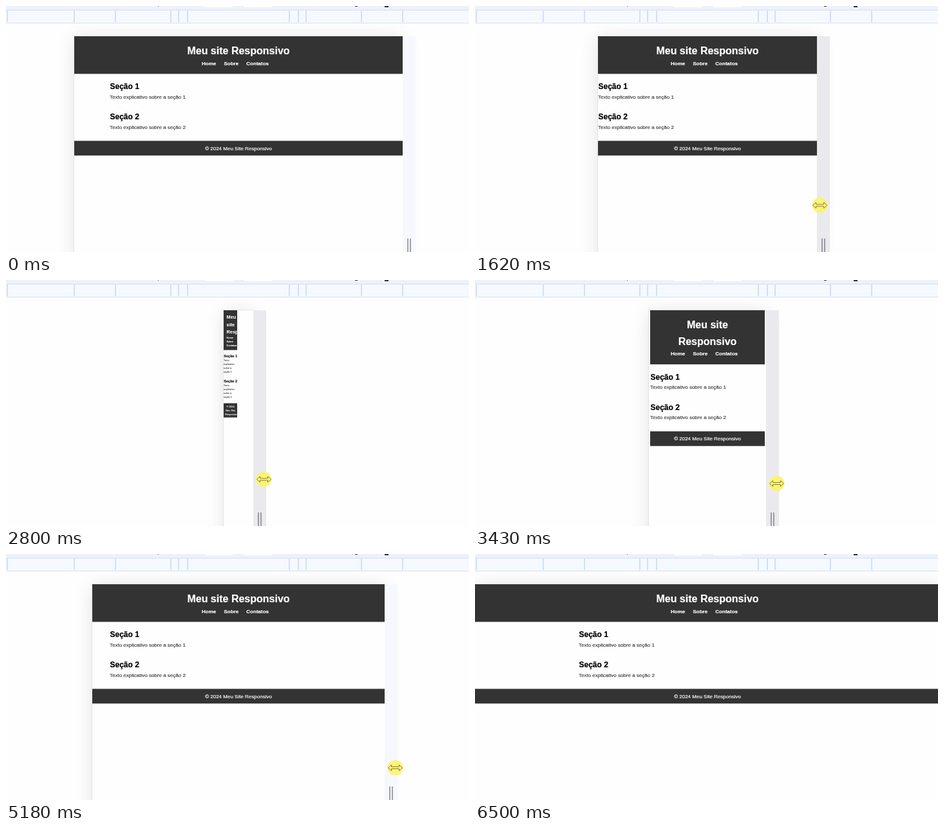
An HTML page with a canvas for the animation above (8.58 s loop, 719 by 382 pixels).

```html
<!DOCTYPE html>
<html lang="pt">
<head>
<meta charset="utf-8">
<title>Meu site Responsivo</title>
<style>
html, body { margin: 0; width: 100%; height: 100%; overflow: hidden; background: #fefefe; }
canvas { display: block; }
</style>
</head>
<body>
<canvas id="stage" width="719" height="382"></canvas>
<script>
const ctx = document.getElementById('stage').getContext('2d');
const LOOP = 8580, STEP = 70, MID = 361, TOP = 47, BOTTOM = 382;
const FACE = '"Liberation Sans", Arial, sans-serif';
const DARK = '#333', PAPER = '#fefefe', EDGE = '#e3e4e6';

// moments of the story in ms
const ENTER = 350, PRESS = 1120, GRAB = 1260, WIDEN = 2800, LIGHT = 5040;

// half the page width while it grows back: [time, value]
const GROWTH = [[WIDEN, 23], [3430, 91], [4340, 171], [4840, 188], [4970, 188],
  [5180, 227], [5880, 315], [6440, 362]];

const clamp = u => Math.min(1, Math.max(0, u));
const mix = (a, b, u) => a + (b - a) * u;
const smooth = u => u * u * (3 - 2 * u);

function along(keys, t) {
  const i = keys.findIndex(([time]) => time > t);
  if (i < 0) return keys[keys.length - 1][1];
  const [t0, a] = keys[i - 1], [t1, b] = keys[i];
  return mix(a, b, (t - t0) / (t1 - t0));
}

function halfWidth(t) {
  if (t < GRAB) return 255;
  if (t >= WIDEN) return along(GROWTH, t);
  return mix(255, 22, smooth(clamp((t - 1140) / 1150)));
}

function mouseAt(t) {
  if (t < GRAB) {
    const u = 1 - (1 - clamp((t - ENTER) / 450)) ** 2;
    return [mix(654, 629, u), mix(372, 316, u)];
  }
  // the page trails behind the pointer while it shrinks
  const lead = Math.max(0, halfWidth(t) - halfWidth(t + 40));
  const y = t < WIDEN ? mix(316, 309.5, clamp((t - GRAB) / 350))
    : Math.min(332, 309.5 + (t - WIDEN) * 0.0104);
  return [MID + halfWidth(t) + 16.5 - lead, y];
}

function rect(color, x, y, w, h) {
  ctx.fillStyle = color;
  ctx.fillRect(x, y, w, h);
}

function setFont(size, bold) {
  ctx.font = (bold ? 'bold ' : '') + size + 'px ' + FACE;
}

// y is the top of a line with 1.6 line height; the hairline firms up small type
function write(text, x, y, size, color, scale) {
  const base = y + size * 1.1465;
  ctx.fillStyle = ctx.strokeStyle = color;
  ctx.lineWidth = 0.2;
  for (const paint of ['fillText', 'strokeText']) {
    ctx[paint](text, x, scale === 1 ? Math.round(base) : base);
  }
}

function wrap(text, room) {
  const lines = [];
  let line = '';
  for (const word of text.split(' ')) {
    const next = line ? line + ' ' + word : word;
    if (line && ctx.measureText(next).width > room) {
      lines.push(line);
      line = word;
    } else line = next;
  }
  return [...lines, line];
}

// wrapped text, returns the y below it
function block(text, o) {
  setFont(o.size, o.bold);
  let y = o.y;
  for (const line of wrap(text, o.room)) {
    const spare = Math.max(0, o.room - ctx.measureText(line).width);
    write(line, o.x + (o.center ? spare / 2 : 0), y, o.size, o.color, o.scale);
    y += o.size * 1.6;
  }
  return y;
}

function navLines(room) {
  setFont(8, true);
  const space = ctx.measureText(' ').width, lines = [];
  let line = null;
  for (const name of ['Home', 'Sobre', 'Contatos']) {
    const w = ctx.measureText(name).width + 10;
    if (!line || line.width + space + w > room) {
      lines.push(line = { items: [], width: 0 });
    } else line.width += space;
    line.items.push([name, line.width]);
    line.width += w;
  }
  return lines;
}

function drawSite(width) {
  setFont(16, true);
  const title = 'Meu site Responsivo';
  // below the longest word's width the whole site is zoomed out
  const scale = Math.min(1, width / (10 + ctx.measureText('Responsivo').width));
  const room = width - 20;
  const rows = wrap(title, room).length, nav = navLines(room);
  const headH = 20 + rows * 25.6 + nav.length * 12.8;

  ctx.save();
  ctx.translate(Math.round(MID - width / 2), TOP);
  ctx.scale(scale, scale);

  rect(DARK, 0, 0, width, headH);
  let y = block(title, { x: 10, y: 10, room, size: 16, bold: true, color: '#fff', center: true, scale });
  setFont(8, true);
  for (const line of nav) {
    const x = 10 + Math.max(0, (room - line.width) / 2);
    for (const [name, dx] of line.items) write(name, x + dx, y, 8, '#fff', scale);
    y += 12.8;
  }

  const inner = Math.min(width, 400), x = (width - inner) / 2;
  y = headH + 10;
  for (const n of [1, 2]) {
    y = block('Seção ' + n, { x: x + 0.5, y, room: inner, size: 12, bold: true, color: '#000', scale });
    y = block('Texto explicativo sobre a seção ' + n,
      { x, y, room: inner, size: 8, color: '#444', scale }) + 15;
  }

  const foot = '© 2024 Meu Site Responsivo';
  setFont(8);
  rect(DARK, 0, y, width, 10 + wrap(foot, width - 10).length * 12.8);
  block(foot, { x: 5, y: y + 5, room: width - 10, size: 8, color: '#fff', center: true, scale });
  ctx.restore();
}

function drawToolbar() {
  rect('#eef1fa', 0, 0, 719, 6);
  for (const x of [309, 370]) rect('#fff', x, 0, 43, 2);
  rect('#555', 236, 0, 1, 1);
  rect('#333', 542, 0, 4, 1);
  rect('#333', 588, 0, 6, 2);
  rect('#f6f9fe', 0, 6, 719, 21);
  for (const y of [6, 26]) rect('#cfe2f8', 0, y, 719, 1);
  for (const d of [79, 93, 105, 191, 255, 359]) {
    for (const x of [360 - d, 360 + d]) rect('#d0e0fb', x, 7, 2, 18);
  }
}

function clipped(x, y, w, h, paint) {
  ctx.save();
  ctx.beginPath();
  ctx.rect(x, y, w, h);
  ctx.clip();
  paint();
  ctx.restore();
}

function drawPage(half, t) {
  const left = MID - half, right = MID + half, width = half * 2;
  clipped(0, 27, 719, BOTTOM, () => {
    ctx.shadowColor = 'rgba(0,0,0,0.11)';
    ctx.shadowBlur = 28;
    ctx.shadowOffsetY = 3;
    rect(PAPER, left, TOP, width, 500);
  });
  rect(EDGE, left - 1, TOP - 1, 1, BOTTOM);
  rect(EDGE, left - 1, TOP - 1, width + 1, 1);

  const active = t >= GRAB && t < LIGHT;
  rect(active ? '#eaeaee' : '#f6f8fd', right, TOP, 20, BOTTOM);
  for (const dx of [7, 11]) rect(active ? '#9c999f' : '#a3a3a3', right + dx, 361, 2, 21);

  // layout runs a little behind during the first widening
  const lag = t > WIDEN && t < 3710 ? 4 : 0;
  clipped(left, TOP, width, BOTTOM, () => drawSite(width - lag));
}

function poly(points, x, y) {
  ctx.beginPath();
  for (const [px, py] of points) ctx.lineTo(x + px, y + py);
  ctx.closePath();
  ctx.fill();
  ctx.stroke();
}

const POINTER = [[0, 0], [0, 16], [4, 12.5], [6.5, 18], [9, 17], [6.5, 11.5], [11.5, 11.5]];
const SIDE = [[-11, 0], [-6, -4.5], [-6, -1.5], [6, -1.5], [6, -4.5]];
const RESIZE = [...SIDE, ...SIDE.map(([x, y]) => [-x, -y])];

function drawMouse(x, y, pressed) {
  ctx.fillStyle = '#fff';
  ctx.strokeStyle = '#111';
  ctx.lineWidth = 1;
  if (pressed) {
    ctx.fillStyle = 'rgba(252,244,108,0.9)';
    ctx.beginPath();
    ctx.arc(x, y, 12, 0, Math.PI * 2);
    ctx.fill();
    ctx.fillStyle = '#fcf78c';
    ctx.strokeStyle = '#7d6c28';
    ctx.lineWidth = 0.9;
  }
  poly(x > 637 && !pressed ? POINTER : RESIZE, x, y);
}

function draw(time) {
  const t = Math.floor(time % LOOP / STEP) * STEP;
  rect(PAPER, 0, 0, 719, 382);
  drawPage(Math.round(halfWidth(t)), t);
  drawToolbar();
  if (t > ENTER) drawMouse(...mouseAt(t), t >= PRESS);
}

const begin = performance.now();
function tick() {
  draw(performance.now() - begin);
  requestAnimationFrame(tick);
}
tick();
</script>
</body>
</html>
```
